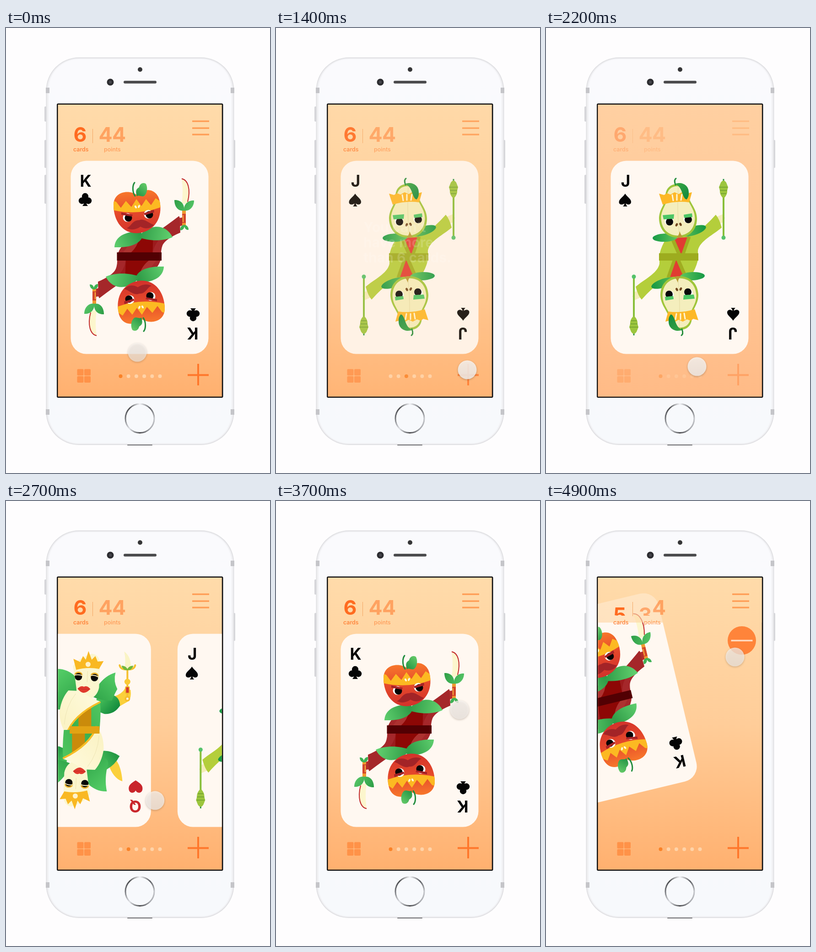
Write an HTML page with a canvas that moves like this. It is 577 px wide and 970 px high and loops after 5000 ms.

```html
<!DOCTYPE html>
<html lang="en">
<head>
<meta charset="utf-8">
<title>Card deck</title>
<style>
html, body { margin: 0; width: 100%; height: 100%; overflow: hidden; background: #fefdfe; }
canvas { display: block; }
</style>
</head>
<body>
<canvas id="stage" width="577" height="970"></canvas>
<script>
const c = document.getElementById('stage').getContext('2d');
const LOOP = 5000, STEP = 100, PITCH = 359;
const FONT = 'Inter, "Liberation Sans", sans-serif';

// ---- helpers ----
function fill(d, color) {
  c.fillStyle = color;
  c.fill(new Path2D(d));
}
function line(d, color, width, cap = 'butt') {
  c.strokeStyle = color;
  c.lineWidth = width;
  c.lineCap = cap;
  c.stroke(new Path2D(d));
}
function oval(x, y, rx, color, ry = rx, angle = 0) {
  c.beginPath();
  c.ellipse(x, y, rx, ry, angle, 0, Math.PI * 2);
  c.fillStyle = color;
  c.fill();
}
function box(x, y, w, h, r, color) {
  c.beginPath();
  c.roundRect(x, y, w, h, r);
  c.fillStyle = color;
  c.fill();
}
function addStops(g, colors) {
  colors.forEach((col, i) => g.addColorStop(i / (colors.length - 1), col));
  return g;
}
function blend(x0, y0, x1, y1, ...colors) {
  return addStops(c.createLinearGradient(x0, y0, x1, y1), colors);
}
function text(str, x, y, size, color, weight = 700, align = 'left') {
  c.font = `${weight} ${size}px ${FONT}`;
  c.textAlign = align;
  c.fillStyle = color;
  c.fillText(str, x, y);
}
function layer(draw) {
  c.save();
  draw();
  c.restore();
}
// Draws a half and its copy turned upside down.
function twice(cx, cy, half) {
  half();
  layer(() => {
    c.translate(2 * cx, 2 * cy);
    c.scale(-1, -1);
    half();
  });
}
// Value of column k at time t, interpolated between rows [time, value, ...].
function key(t, rows, k = 1) {
  if (t <= rows[0][0]) return rows[0][k];
  for (let i = 1; i < rows.length; i++) {
    const a = rows[i - 1], b = rows[i];
    if (t <= b[0]) return a[k] + (b[k] - a[k]) * (t - a[0]) / (b[0] - a[0]);
  }
  return rows[rows.length - 1][k];
}

// ---- suits ----
function club() {
  oval(173, 367, 7.2, '#050505');
  oval(166, 376.5, 7.2, '#050505');
  oval(180, 376.5, 7.2, '#050505');
  fill('M170 370 H176 Q174 384 179 388 H167 Q172 384 170 370Z', '#050505');
}
function spade() {
  fill('M173 361 C177 368 187 373 186 380 C185 386 177 386 174.5 382 Q175 387 178 389 H168 Q171 387 171.5 382 C169 386 160 386 159.5 380 C159 373 169 368 173 361Z', '#050505');
}
function heart() {
  fill('M173 390 C163 384 157 379 158 371 C159 361 170 361 173 368 C176 361 187 361 188 371 C189 379 183 384 173 390Z', '#c9252b');
}

// ---- king ----
function kingBody() {
  fill('M243 500 Q244 484 262 466 L328 446 Q352 430 378 410 Q380 412 380 418 L381 446 Q348 460 342 474 Q338 484 339 500Z', '#a5272a');
  fill('M292 452 L322 456 L320 500 H262 Q268 478 292 452Z', '#8d0705');
  fill('M274 466 L292 454 Q288 478 270 492 L252 494Z', '#ad3230');
  fill('M322 456 L338 458 Q322 474 321 492Z', '#9c1b1d');
}
function sword() {
  fill('M379 414 L387 413 V430 L380 432Z', '#b42d2c');
  box(385, 396, 8, 36, 2, '#f09a2e');
  fill('M385 405 H393 V425 H385Z', '#d3472b');
  line('M387 408 V423', '#f6b13d', 2);
  fill('M384 383 Q388 356 384 329 C398 331 405 352 396 383Z', '#fcf6cd');
  line('M384 328.5 C398 331 404 352 397 379', '#c1272b', 2);
  const leaf = blend(370, 375, 410, 398, '#2f9f47', '#58c768');
  fill('M389 398 C375 400 368 388 368 375 C382 374 391 384 389 398Z', leaf);
  fill('M389 398 C388 384 398 375 411 376 C411 389 402 400 389 398Z', leaf);
  fill('M389 429 Q380 431 381 441 Q388 441 390 433 Q392 441 399 440 Q399 430 389 429Z', '#3eb255');
}
function kingHead() {
  fill('M237 478 C238 456 258 443 292 444 Q303 450 297 458 C288 474 264 479 237 478Z', blend(240, 472, 292, 448, '#5bcb6b', '#2e9a46'));
  fill('M290 456 C304 432 346 420 364 456 C344 465 312 465 290 456Z', blend(296, 446, 358, 458, '#329f4a', '#60ce6d'));
  layer(() => {
    const apple = new Path2D('M288 365 C302 346 331 350 336 378 C343 412 326 443 290 447 C257 450 236 423 235 388 C234 356 269 351 288 365Z');
    c.fillStyle = blend(284, 354, 291, 446, '#f8792b', '#e5492b', '#d3322b');
    c.fill(apple);
    c.clip(apple);
    fill('M230 375 L241 379 L251 392 L262 377 L274 390 L285 373 L296 388 L306 373 L317 386 L327 371 L340 380 V390 Q288 410 230 396Z', '#fcb922');
  });
  oval(283.5, 390, 2, '#fff8df', 3.5, -.5);
  oval(290.5, 389, 2, '#fff8df', 3.5, .4);
  for (const [x, y] of [[266, 413], [312, 406]]) {
    oval(x - 1, y, 9.5, '#fff');
    oval(x + 1.5, y + 1, 8, '#080404');
  }
  fill('M252 402 L277 407 L275 411 L252 407Z', '#a52327');
  fill('M301 404 L323 396 L324 402 L303 408Z', '#a52327');
  fill('M264 436 C273 434 276 418 291 419 C303 414 312 426 323 429 C315 439 302 438 294 433 C284 440 273 441 264 436Z', '#a32427');
  line('M282 366 C276 358 276 343 281 337', '#208c3d', 3, 'round');
  fill('M286 367 C282 352 286 351 291 347 C293 338 301 336 306 340 C310 348 309 360 302 366 C296 369 290 363 286 367Z', blend(284, 365, 305, 340, '#229344', '#63c967'));
}
function king() {
  twice(291, 499.5, () => { kingBody(); sword(); });
  twice(291, 499, kingHead);
  box(242.5, 489, 97.5, 18, 0, '#520003');
}

// ---- queen ----
function queenArms() {
  fill('M202 388 C216 392 226 406 232 424 L221 439 C208 430 203 405 202 388Z', '#fbd03b');
  fill('M208 443 Q218 424 236 414 L266 430 L258 452 Q232 460 208 443Z', blend(218, 446, 255, 420, '#259a45', '#4fc65e'));
  fill('M362 426 Q380 420 386 408 L398 412 Q400 428 394 436 L373 448Z', '#fbd03b');
  fill('M324 430 L357 422 Q374 427 375 446 Q362 466 340 464 L318 455Z', blend(365, 455, 335, 428, '#168d3e', '#45bd59'));
}
function bananaStaff() {
  line('M391 365 V427', '#f5c130', 4);
  oval(391, 431, 6, '#f5bd2d');
  oval(391, 431, 2.5, '#fff4d4');
  box(386, 404, 10, 16, 2, '#f2b72b');
  box(388, 406, 6, 12, 1, '#d63a2d');
  oval(391, 394, 6.5, '#f9ca36');
  fill('M385 364 Q388 346 384 328 Q400 340 398 364Z', '#faf4c5');
  line('M374 358 Q376 368 391 367 Q406 368 408 358', '#f5c130', 4, 'round');
  fill('M391 369 Q381 369 378 359 Q388 359 391 367 Q394 359 404 359 Q401 369 391 369Z', '#6fb83c');
}
function queenBody() {
  fill('M256 500 L270 440 L331 438 Q334 455 330 500Z', blend(260, 490, 330, 445, '#35ad4e', '#50c55f'));
  fill('M284 448 H312 V500 H284Z', '#ca8b0b');
  fill('M236 366 Q259 365 278 383 L285 424 L263 441 Q234 444 233 427 Q242 395 236 366Z', blend(238, 380, 282, 432, '#51ca64', '#32a74b'));
  fill('M365 374 Q343 380 327 402 L313 426 Q338 437 357 435 Q363 420 369 410 Q360 393 365 374Z', blend(362, 380, 320, 428, '#51ca64', '#32a74b'));
  fill('M272 360 Q286 340 314 333 Q329 335 331 353 L329 407 Q325 426 307 433 L281 425 Q278 390 272 360Z', '#fbf6ce');
  fill('M262 413 Q247 430 243 457 Q242 488 258 508 Q273 465 332 437 Q309 430 288 414Z', blend(246, 480, 315, 425, '#fbf3c5', '#fef9da'));
  line('M258 508 Q272 467 332 438', '#f7bd26', 4);
  line('M253 487 Q256 448 278 420', '#eee5b5', 1);
}
function queenFace() {
  fill('M279 368 L273 344 L288 351 L294 338 L300 346 L306 327 L313 346 L321 338 L326 350 L339 349 L329 366 Q304 361 279 368Z', '#f9b822');
  oval(305, 356, 5.5, '#fff2c8');
  for (const [x, y] of [[284, 382], [319, 384]]) {
    oval(x, y - 3, 9, '#e8ad25', 7);
    oval(x, y + 1, 8, '#070707');
  }
  line('M274 380 Q284 377 294 381 M309 381 Q319 378 328 384', '#f7ecbb', 2);
  fill('M282 409 Q290 401 296 405 Q303 401 310 410 Q301 419 294 418 Q287 416 282 409Z', '#e03a2d');
  line('M283 409 Q296 411 309 410', '#bb2823', 1);
  line('M304 371 Q303 386 303 395', '#eee3ad', 1);
}
function queen() {
  twice(291, 499.5, () => { queenArms(); bananaStaff(); queenBody(); queenFace(); });
  box(265, 491, 65, 16, 0, '#e2a314');
}

// ---- jack ----
function scepter() {
  line('M388 362 V456', '#88bf3b', 4);
  oval(388, 457, 4.5, '#55c26a');
  line('M388 329 V337', '#349747', 3);
  fill('M382 337 Q388 328 394 337 L398 347 L396 354 Q397 362 390 370 H386 Q379 362 380 354 L378 347Z', '#9cc53d');
  line('M379 347 H397 M380 354 H396 M382 361 H394', '#78a832', 2);
}
function jackBody() {
  fill('M370 413 L386 406 L391 414 L387 424 L377 426Z', '#f4edba');
  fill('M247 500 Q249 483 259 465 L327 447 Q349 432 371 407 Q379 416 384 435 C367 450 336 464 332 485 V500Z', '#b4ce3b');
  fill('M280 458 L309 456 L295 500 H288Z', '#e13c32');
  line('M277 461 L294 500', '#a0ad21', 8);
  line('M313 455 L297 500', '#a0ad21', 7);
}
function jackHead() {
  oval(260, 457, 27, blend(233, 457, 287, 457, '#169a46', '#62c65c'), 9, -.04);
  oval(323, 442, 28, blend(297, 450, 349, 435, '#60bf55', '#149844'), 9.5, -.32);
  const pear = 'M287 340 C304 340 313 352 313 372 C319 387 330 397 330 417 C329 442 313 456 289 457 C264 457 248 441 247 416 C247 395 260 386 261 370 C260 352 270 340 287 340Z';
  fill(pear, '#9fc53b');
  layer(() => {
    c.translate(288, 400);
    c.scale(.89, .92);
    c.translate(-288, -400);
    fill(pear, '#f4eebd');
  });
  line('M289 345 Q286 400 291 446', '#e3d9a0', 1);
  fill('M285 457 Q291 452 292 443 Q295 452 300 456Z', '#b99b35');
  fill('M247 361 L258 364 L264 360 L272 363 L281 358 L290 362 L299 357 L307 361 L319 358 L313 380 Q284 376 255 385Z', '#fdb827');
  line('M276 364 L278 376 M286 363 V375 M297 363 L295 375', '#fff5d5', 3, 'round');
  fill('M282 340 C296 334 312 342 312 358 Q313 368 307 374 C296 369 300 347 282 340Z', blend(286, 340, 309, 370, '#35a443', '#128a3e'));
  line('M283 342 Q279 331 284 328', '#258e3c', 3, 'round');
  for (const [x, y] of [[269, 421], [310, 416]]) {
    oval(x, y, 9.5, '#fff');
    oval(x + 1, y + 1.5, 8, '#080808');
  }
  fill('M255 408 L280 406 L279 416 L257 417Z', '#4cc665');
  fill('M301 407 L319 404 L320 412 L302 414Z', '#4cc665');
  oval(285.5, 429, 2.4, '#72491f', 3.8, .5);
  oval(294, 428, 2.4, '#72491f', 3.8, -.5);
}
function jack() {
  twice(290, 499.5, () => { jackBody(); scepter(); });
  twice(290, 499, jackHead);
  box(247, 491, 86, 16, 0, '#9dac1f');
}

const deck = [
  { rank: 'K', suit: club, figure: king, ink: '#050505' },
  { rank: 'Q', suit: heart, figure: queen, ink: '#c9252b' },
  { rank: 'J', suit: spade, figure: jack, ink: '#050505' }
];
function drawCard(card, dx, dy, angle) {
  layer(() => {
    c.translate(292 + dx, 499.5 + dy);
    c.rotate(angle * Math.PI / 180);
    c.translate(-292, -499.5);
    box(141.5, 289.5, 301, 421, 34, '#fff8f1');
    twice(291, 499.5, () => {
      text(card.rank, 174, 346, 35, card.ink, 700, 'center');
      card.suit();
    });
    card.figure();
  });
}

// ---- phone ----
function drawPhone() {
  c.fillStyle = '#fefdfe';
  c.fillRect(0, 0, 577, 970);
  for (const [x, y, h] of [[84, 171, 33], [84, 244, 61], [84, 320, 63], [496, 244, 61]]) {
    box(x, y, 5, h, 2, '#d5d5d9');
  }
  box(87.5, 64, 411, 845, 72, '#e0e0e3');
  box(89.5, 66, 407, 841, 70, '#f1f1f4');
  box(93, 68, 400, 837, 66, blend(0, 68, 0, 905, '#fafafd', '#f7f9fc'));
  for (const y of [130, 831]) {
    box(87, y, 8, 12, 0, '#c5c5c9');
    box(491, y, 8, 12, 0, '#c5c5c9');
  }
  oval(293, 90.5, 5, '#353537');
  oval(228, 118, 7.5, '#2c2c30');
  oval(228, 118, 3, '#47474e');
  box(257, 115, 72, 6, 3, '#4c4c4e');
  box(265, 908, 55, 2, 1, '#727275');
  c.beginPath();
  c.arc(292.5, 851, 31.5, 0, Math.PI * 2);
  c.strokeStyle = addStops(c.createConicGradient(0, 292.5, 851),
    ['#c4c6ca', '#a9abb0', '#4c4d50', '#dfe1e5', '#77797d', '#4c4d50', '#f3f4f7', '#5c5e62', '#c4c6ca']);
  c.lineWidth = 3;
  c.stroke();
}

// ---- interface ----
function drawCounter(roll) {
  const up = 53 * roll, dark = '#ff6b20', pale = 'rgba(255,126,50,.6)';
  layer(() => {
    c.beginPath();
    c.rect(113, 212, 360, 38);
    c.clip();
    text('6', 147.5, 248 - up, 44.5, dark);
    text('5', 147.5, 301 - up, 44.5, dark);
    text('4', 202.5, 248 - up, 44.5, pale);
    text('3', 202.5, 301 - up, 44.5, pale);
    text('4', 232, 248, 44.5, pale);
  });
  text('cards', 147, 269, 12.5, '#ff7c30', 500);
  text('points', 214, 269, 12.5, '#ff9b58', 500);
  box(189, 220, 1, 31, 0, '#f3a765');
}
function drawControls(active) {
  for (const y of [201.5, 216.5, 230.5]) box(407, y, 37, 3.5, 0, '#ff9f58');
  for (const x of [155.5, 171]) {
    for (const y of [743.5, 759]) box(x, y, 14, 14, 2, '#ff9248');
  }
  for (let i = 0; i < 6; i++) {
    oval(250.5 + 17.2 * i, 759, 4, i === active ? '#f98228' : '#ffd3a8');
  }
  line('M397 756.5 H443 M420 732 V779', '#ff772b', 4);
}
function drawNotice(alpha) {
  if (!alpha) return;
  c.globalAlpha = alpha;
  box(113, 166, 360, 639, 0, '#ffcf9f');
  c.globalAlpha = Math.min(1, alpha * 1.2);
  ['You can’t', 'have more', 'than 6 cards.'].forEach((s, i) => text(s, 191, 445 + 33 * i, 30, '#fff'));
  c.globalAlpha = 1;
}
function drawRemove(alpha) {
  if (!alpha) return;
  c.globalAlpha = alpha;
  oval(428, 304, 31, '#ff6e1d');
  box(404.5, 302.5, 47, 3.5, 0, '#fff3e4');
  c.globalAlpha = 1;
}
function drawTouch(x, y, alpha) {
  layer(() => {
    c.globalAlpha = alpha;
    c.shadowColor = 'rgba(70,45,25,.35)';
    c.shadowBlur = 4;
    c.shadowOffsetY = 1.5;
    oval(x, y, 20.5, blend(x, y - 20, x, y + 20, '#faf6f2', '#f1ece8'));
  });
}

// ---- timeline ----
const scroll = [[0, 0], [100, .18], [200, .7], [300, 1], [400, 1.12], [500, 1.65], [600, 1.95], [700, 2],
  [2500, 2], [2600, 1.8], [2700, 1.35], [2900, 1], [3100, 1], [3200, 1 - 71 / PITCH], [3300, .4], [3400, .1], [3500, 0]];
const finger = [[0, 287, 707, .65], [100, 318, 694, .8], [300, 246, 684, .8], [400, 316, 690, .8],
  [600, 258, 685, .8], [700, 263, 685, .75], [1000, 342, 712, .8], [1300, 418, 745, .85], [1900, 418, 745, .85],
  [2200, 330, 738, .85], [2450, 265, 665, .8], [2800, 350, 648, .75], [3050, 278, 643, .7], [3200, 314, 642, .7],
  [3450, 370, 630, .75], [3900, 426, 315, .75], [4050, 424, 320, .75], [4200, 413, 390, .7], [4900, 413, 340, .7]];
const notice = [[1300, 0], [1400, .14], [1600, .92], [1900, .92], [2100, 0]];
const veil = [[1500, 0], [1700, 1], [2050, .95], [2200, .62], [2400, 0]];
const roll = [[4050, 0], [4200, .5], [4900, .7]];
const remove = [[3700, 0], [3850, 1], [4700, 1], [4900, .78]];
const toss = [[4100, 0, 0, 0], [4200, 1, .5, .7], [4500, -14, -8, -1], [4700, -65, -30, -6], [4900, -151, -66, -13.5]];

function draw(t) {
  const pos = key(t, scroll), hidden = key(t, veil);
  const flying = t > 4200;
  const active = t > 2100 && t < 2300 ? 0 : Math.round(pos);
  const sky = blend(0, 166, 0, 805, '#ffdbaa', '#ffcd99', '#ffb06f');

  drawPhone();
  box(111, 164.5, 363.5, 641.5, 3, '#111');
  layer(() => {
    c.beginPath();
    c.rect(113.5, 167, 358.3, 636.5);
    c.clip();
    c.fillStyle = sky;
    c.fillRect(113, 166, 361, 639);
    c.globalAlpha = hidden;
    c.fillStyle = blend(0, 166, 0, 805, '#ffc99c', '#ffc194');
    c.fillRect(113, 166, 361, 639);
    c.globalAlpha = 1;

    deck.forEach((card, i) => {
      const dx = (i - pos) * PITCH;
      if (Math.abs(dx) >= 335) return;
      drawCard(card, dx + key(t, toss, 1), key(t, toss, 2), key(t, toss, 3));
    });
    if (flying) {
      c.globalAlpha = .65;
      c.fillStyle = sky;
      c.fillRect(113, 166, 361, 99);
    }
    c.globalAlpha = 1 - hidden;
    drawCounter(key(t, roll));
    drawControls(active);
    c.globalAlpha = 1;
    drawNotice(key(t, notice));
    drawRemove(key(t, remove));
    drawTouch(key(t, finger, 1), key(t, finger, 2), key(t, finger, 3));
  });
}

const start = performance.now();
function tick() {
  const t = Math.max(0, performance.now() - start) % LOOP;
  draw(Math.floor(t / STEP) * STEP);
  requestAnimationFrame(tick);
}
tick();
</script>
</body>
</html>
```
